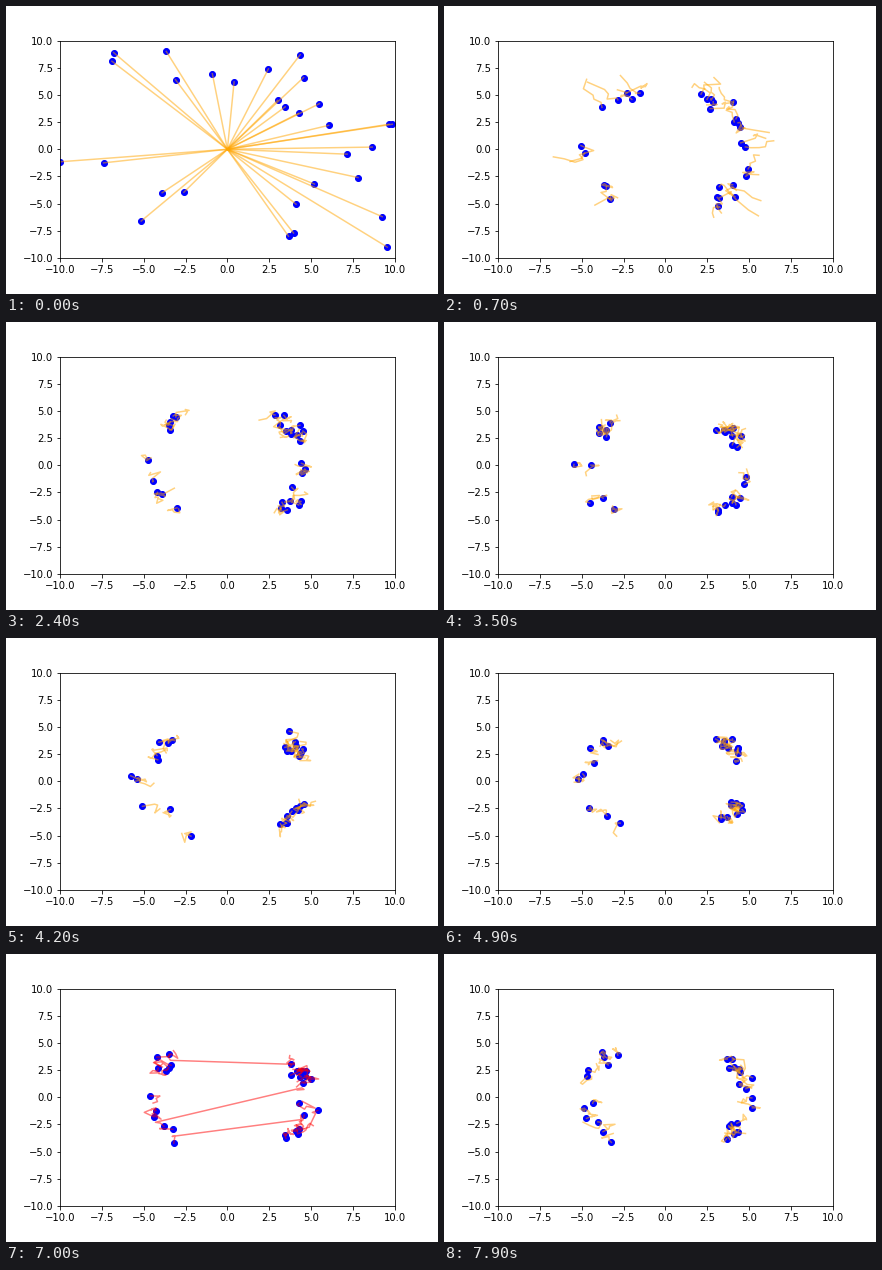
Write a matplotlib script that moves like this. It is 432 by 288 pixels and loops after 8000 ms.

```python
import numpy as np
import matplotlib.pyplot as plt
from matplotlib.animation import FuncAnimation

FRAMES, TRAIL = 80, 5
DT = 0.036
RADIUS, RING_SD = 5, 0.34   # particles settle on a ring ...
CENTRE, WING_SD = 4, 0.65   # ... and gather around x = +-CENTRE

START = np.array([
    (2.45, 7.4), (0.4, 6.2), (4.35, 8.7), (4.55, 6.6), (3, 4.5),
    (3.45, 3.9), (4.25, 3.3), (5.5, 4.2), (6.05, 2.2), (9.65, 2.3),
    (9.85, 2.3), (8.65, 0.2), (7.15, -0.45), (7.8, -2.6), (5.2, -3.2),
    (9.25, -6.2), (9.55, -9), (4.1, -5.05), (3.95, -7.7), (3.65, -8),
    (-0.9, 6.95), (-3.65, 9), (-3.1, 6.4), (-6.8, 8.9), (-6.9, 8.1),
    (-10, -1.15), (-7.4, -1.25), (-3.9, -4), (-5.15, -6.6), (-2.6, -3.95)])

# At these frames the particle nearest the first point leaps to the second
LEAPS = {
    59: [((-3.1, -3.7), (4.9, -0.1)), ((-3.1, -3.7), (4.7, 1.4)),
         ((4, 3.3), (-4.1, -2.1))],
    68: [((4, 3), (-3.4, 3.4)), ((4.8, 1), (-4.3, -2.3)),
         ((4.4, -2), (-3.3, -3.6))],
}


def gradient(p):
    """Slope of the two-winged ring potential."""
    r = np.linalg.norm(p, axis=1, keepdims=True)
    grad = (r - RADIUS) / RING_SD**2 * p / r
    x = p[:, 0]
    grad[:, 0] += (x - CENTRE * np.tanh(CENTRE * x / WING_SD**2)) / WING_SD**2
    return grad


def simulate():
    """Langevin walk: slide downhill with random kicks."""
    rng = np.random.default_rng(4)
    path = [START]
    for f in range(1, FRAMES):
        p = path[-1]
        kick = rng.normal(0, np.sqrt(2 * DT), p.shape)
        p = p - DT * gradient(p) + kick
        for a, b in LEAPS.get(f, []):
            p[np.linalg.norm(path[-1] - a, axis=1).argsort()
              [0 if (a, b) == LEAPS[f][0] or a != LEAPS[f][0][0] else 1]] = b
        path.append(p)
    return np.array(path)


path = simulate()
history = np.concatenate([np.zeros((TRAIL, *START.shape)), path])

fig, ax = plt.subplots(figsize=(6, 4), dpi=72, facecolor="white")
fig.subplots_adjust(left=0.125, right=0.9, bottom=0.125, top=0.88)
ticks = np.arange(-10, 11, 2.5)
ax.set(xlim=(-10, 10), ylim=(-10, 10), xticks=ticks, yticks=ticks)
dots = ax.scatter(*START.T, s=36, color="blue")
trails = [ax.plot([], [], color="orange", alpha=0.5, lw=1.5)[0] for _ in START]


def update(f):
    dots.set_offsets(path[f])
    leapt = any(0 <= f - start < TRAIL for start in LEAPS)
    for i, line in enumerate(trails):
        line.set_data(*history[f:f + TRAIL + 1, i].T)
        line.set_color("red" if leapt else "orange")
    return [dots, *trails]


anim = FuncAnimation(fig, update, frames=FRAMES, interval=100,
                     repeat=True, repeat_delay=0)
plt.show()
```
